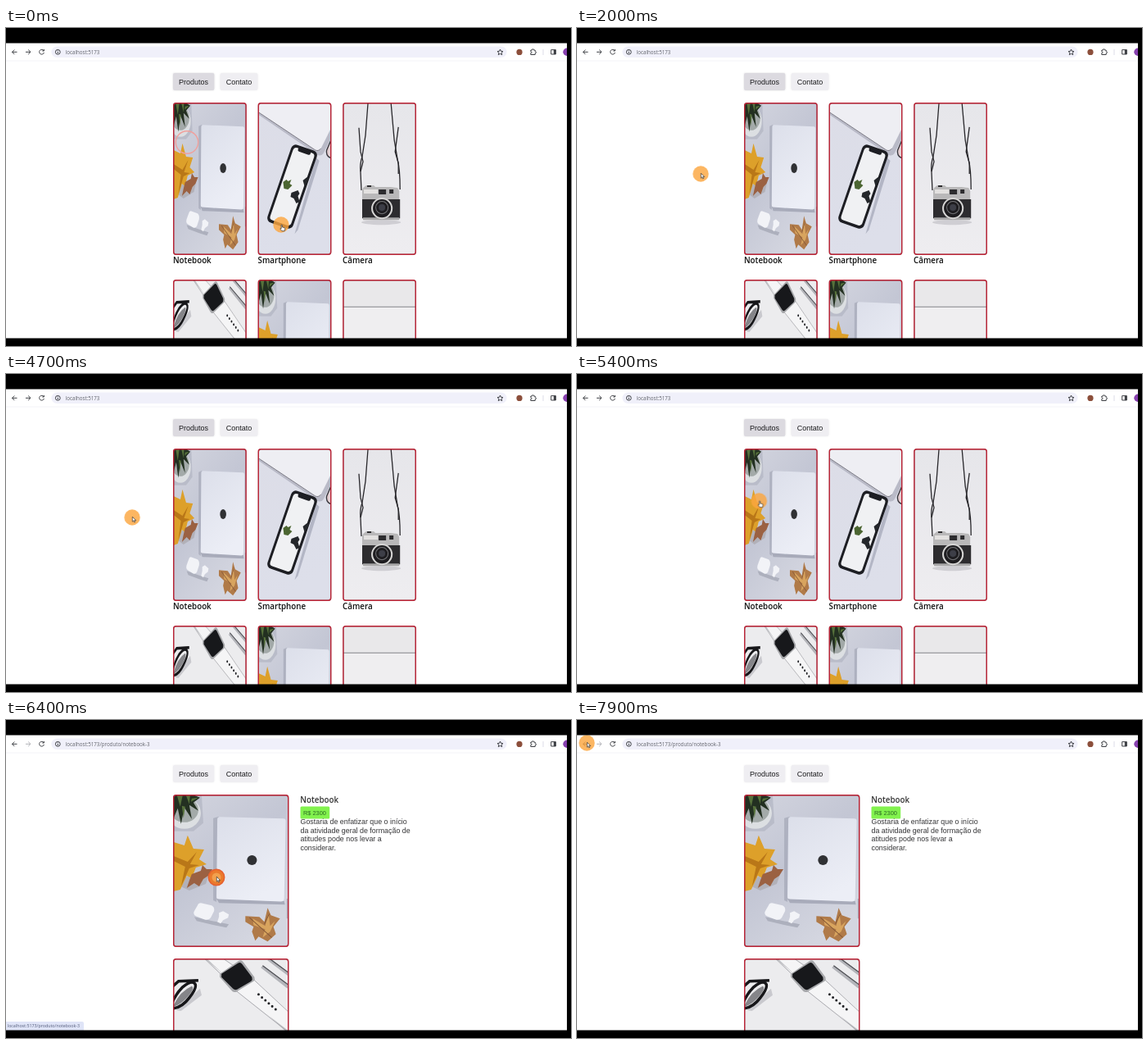
An HTML page that plays this animation: 690 by 388 pixels, repeating every 8 s.

```html
<!DOCTYPE html>
<html lang="pt-BR">
<head>
<meta charset="utf-8">
<title>Produtos</title>
<style>
html, body { margin: 0; width: 100%; height: 100%; overflow: hidden; background: #000; }
#stage { display: block; width: 690px; height: 388px; }
text { font-family: "Liberation Sans", Arial, sans-serif; font-size: 9px; fill: #1d1d1f; white-space: pre; }
.name { font: 600 9.8px "Open Sans", "Noto Sans", sans-serif; fill: #111; }
.url { font: 6.2px "Open Sans", "Noto Sans", sans-serif; fill: #62646c; }
.status { font: 5.3px "Open Sans", "Noto Sans", sans-serif; fill: #555d7c; }
.body { font-size: 8.9px; fill: #343436; }
.price { font-size: 7.4px; fill: #2c6b24; }
.btn { fill: #efeef2; filter: drop-shadow(0 .5px .8px #0001); }
.btn.on { fill: #dcdae0; }
.card { fill: none; stroke: #bd2437; stroke-width: 1.4; filter: drop-shadow(.8px .8px .7px #0005); }
.icon { fill: none; stroke: #3f4146; stroke-width: 1; stroke-linejoin: round; }
.strap { fill: none; stroke: #28272b; stroke-width: 1.3; }
.spot { fill: #fba63f; opacity: .82; }

.list, .detail, .hover, .old, .hand, .arrow, .press { animation: 8s step-end infinite; }
.list { animation-name: list; }
.detail { animation-name: detail; }
.hover { animation-name: hover; }
.old { animation-name: old; }
.hand { animation-name: hand; }
.arrow { animation-name: arrow; }
.press { animation-name: press; }
.ripple { animation: ripple 8s linear infinite; }
#cursor { animation: travel 8s linear infinite; }

@keyframes list { 0% { visibility: visible } 80%, 100% { visibility: hidden } }
@keyframes detail { 0% { visibility: hidden } 80%, 100% { visibility: visible } }
@keyframes hover { 0% { visibility: hidden } 75% { visibility: visible } 87.5%, 100% { visibility: hidden } }
@keyframes old { 0% { visibility: visible } 1.25%, 100% { visibility: hidden } }
@keyframes hand {
  0% { visibility: visible } 19.5% { visibility: hidden } 34.5% { visibility: visible }
  38.5% { visibility: hidden } 64% { visibility: visible } 80%, 100% { visibility: hidden }
}
@keyframes arrow {
  0% { visibility: hidden } 19.5% { visibility: visible } 34.5% { visibility: hidden }
  38.5% { visibility: visible } 64% { visibility: hidden } 80%, 100% { visibility: visible }
}
@keyframes press { 0% { visibility: hidden } 80% { visibility: visible } 83.75%, 100% { visibility: hidden } }
@keyframes ripple {
  0%, 79.9% { opacity: 0; transform: scale(1) }
  80%, 82.5% { opacity: 1; transform: scale(1) }
  85% { opacity: .5; transform: scale(1.4) }
  86%, 100% { opacity: 0; transform: scale(1.4) }
}
@keyframes travel {
  0% { transform: translate(336px, 240px) }
  3.75% { transform: translate(333px, 239.5px) }
  11.25% { transform: translate(284px, 225px) }
  15% { transform: translate(262px, 217.5px) }
  22.5% { transform: translate(162px, 182px) }
  25% { transform: translate(151px, 178px) }
  33.75% { transform: translate(200px, 160px) }
  37.5% { transform: translate(210px, 156px) }
  42.5%, 58.75% { transform: translate(154px, 175px) }
  68.75% { transform: translate(232px, 152px) }
  72.5%, 85% { transform: translate(257px, 192px); animation-timing-function: ease-in-out }
  93.75%, 100% { transform: translate(12px, 28px) }
}
</style>
</head>
<body>
<svg id="stage" viewBox="0 0 690 388" xmlns="http://www.w3.org/2000/svg">
<defs>
  <linearGradient id="desk" x2=".6" y2="1">
    <stop stop-color="#d3d5df"/><stop offset=".5" stop-color="#c3c6d4"/><stop offset="1" stop-color="#d4d6e0"/>
  </linearGradient>
  <linearGradient id="lid" x2=".5" y2="1">
    <stop stop-color="#dcdfea"/><stop offset="1" stop-color="#eceef6"/>
  </linearGradient>
  <linearGradient id="table" x2=".4" y2="1">
    <stop stop-color="#dcdde7"/><stop offset="1" stop-color="#dddfea"/>
  </linearGradient>
  <linearGradient id="paper" x2="0" y2="1">
    <stop stop-color="#e6e6ea"/><stop offset="1" stop-color="#eeedf0"/>
  </linearGradient>

  <symbol id="notebook" viewBox="0 0 139 184" preserveAspectRatio="none">
    <path fill="url(#desk)" d="M0 0h139v184H0z"/>
    <path fill="#aeb1bf" d="M0 0h34l2 34-12 10H0z" opacity=".6"/>
    <ellipse cx="13" cy="22" rx="20" ry="19" fill="#dcdfe2"/>
    <ellipse cx="13" cy="18" rx="17" ry="15" fill="#a3aaa9"/>
    <path fill="#233021" d="M0 0h25l7 3-8 6 6 10-11-7 3 17-9-14-4 20-4-19-5 12z"/>
    <path fill="#56713b" d="M4 0l4 14 3-14zM15 0l4 11 1-11zM10 13l2 15 2-14zM22 4l8-1-9 5z"/>
    <path fill="#8f8785" d="M2 108l18-11 25-7-6 18-20 8z" opacity=".35"/>
    <path fill="#dda02a" d="M0 57l13 4 4-12 7 16 13 1-6 12 9 6-13 4-5 13-6-3-8 17-8 2z"/>
    <path fill="#b97718" d="M0 74l17 7 11-12-8 15 11 1-12 4-10 22 5-24-14-7z"/>
    <path fill="#9b6142" d="M22 96l11-4 2-7 5 5 7 0-5 8-6 4-5 9-6-4-9 6 3-9z"/>
    <path fill="#9a9dad" d="M48 28l7-2-3 104-4-2z" opacity=".55"/>
    <path fill="#a8abba" d="M52 126l82 3 1 4-80-2z"/>
    <path fill="url(#lid)" d="M56 26.500l77 2q3 0 3 3l-2 94q0 4-4 4l-75-3q-3 0-3-3l1-94q0-3 3-3z"/>
    <path fill="#aeb0bd" d="M137 126h2v24h-2z"/>
    <circle cx="95" cy="79" r="6" fill="#303134"/>
    <path fill="#adb0bd" d="M25 148l22 5 20 4-3 4-15-3-21-5z"/>
    <path fill="#f2f3f7" d="M33 131l13 3q4 2 3 7l-4 8q-3 4-8 2l-10-4q-4-2-2-6l4-7q1-3 4-3zM55 143l5-2 7 4-1 4-6 3-3 4-4-2 2-6z"/>
    <path fill="#b07a48" d="M87 147l17 1 6 6 4-17 4 9 11 4-8 10 3 9-10 9-11-6-4 5-4-11 2-6-10-6z"/>
    <path fill="#d8a45e" d="M96 150l15 9 4-15 2 15 6-6-6 13-9 7 3-10-14-5z"/>
    <path fill="none" stroke="#875a37" d="M92 149l27 24m-9-16 6-13"/>
  </symbol>

  <symbol id="phone" viewBox="0 0 88 184" preserveAspectRatio="none">
    <path fill="url(#table)" d="M0 0h88v184H0z"/>
    <path fill="#b9bac7" d="M0 14l72 49q4 2 7-2L88 43V0H0z"/>
    <path fill="#eeeef3" d="M0 0h88v31L76 55q-3 4-7 2L0 11z"/>
    <path fill="none" stroke="#76757f" stroke-width=".9" d="M0 11l69 46q4 2 7-2"/>
    <path fill="#e4cfd2" stroke="#38373d" stroke-width="1.400" d="M89 43l-6 14q-1 5 2 8l5 3"/>
    <path fill="#b3b6c5" d="M70 66l4 4-26 84-4 5z"/>
    <g transform="translate(41 101.500) rotate(19)">
      <rect x="-16.500" y="-50" width="33" height="100" rx="6" fill="#1d1e23"/>
      <rect x="-13.500" y="-46.500" width="27" height="93" rx="4" fill="#f0f1f3"/>
      <rect x="-8" y="-48" width="16" height="5" rx="2" fill="#1d1e23"/>
    </g>
    <path fill="#4c6632" d="M30 96l4-3 2 2 4-2-2 5 3 2-5 5-5-1z"/>
    <path fill="#24272b" d="M40 109l8-3 2 4-2 3 2 7-4 2-3-6-4-2zM54 94l5-4 2 3-5 8z"/>
  </symbol>

  <symbol id="camera" viewBox="0 0 88 184" preserveAspectRatio="none">
    <path fill="url(#paper)" d="M0 0h88v184H0z"/>
    <path class="strap" d="M30 0l-3 39-4 26q-3 8-2 19l1 22M58 0l4 45 4 24q3 11 3 36"/>
    <path class="strap" d="M19 30l2 29 3 12-3 12M67 29l-4 30 4 14v13"/>
    <ellipse cx="46" cy="145" rx="24" ry="3" fill="#cfced3"/>
    <path fill="#b9b8b9" d="M24 103l4-3h9l2 2h18l9 1 2 4v11H23v-12z"/>
    <path fill="#e3e1e0" d="M25 105h17v5H25z"/>
    <path fill="#2d2c2f" d="M43 105h9v6h-9zm13 0h5v5h-5zM29 100h5v2h-5zM23 117h46v23H23z"/>
    <path fill="#a9a8a9" d="M24 139h44v3H24z"/>
    <circle cx="47" cy="128" r="13" fill="#d8d7d6"/>
    <circle cx="47" cy="128" r="11" fill="#1e1d20"/>
    <circle cx="47" cy="127" r="7.500" fill="none" stroke="#77777a" stroke-width="1"/>
    <circle cx="47" cy="127" r="4" fill="#3d3e47"/>
  </symbol>

  <symbol id="watch" viewBox="0 0 139 184" preserveAspectRatio="none">
    <path fill="#ececee" d="M0 0h139v184H0z"/>
    <path fill="#bfc0c4" d="M38 0h19l10 8-8 9zM82 37l12-7 45 47v14z"/>
    <path fill="#f5f5f6" d="M41 0h20l13 9-13 10zM75 38l20-15 44 40v24z"/>
    <path fill="none" stroke="#a5a5aa" stroke-width=".9" d="M38 0l21 20M61 0l13 9M75 38l64 51M95 23l44 41"/>
    <path fill="#a6a7aa" d="M56 18l23-16q3-1 5 1l14 19q1 3-1 5L76 40q-4 1-6-2L56 22z"/>
    <path fill="#17181b" d="M58 18l20-13q3-2 5 1l12 16q1 3-1 5L77 37q-3 1-5-1L58 22z"/>
    <path fill="none" stroke="#202125" stroke-width="3" stroke-linecap="round" stroke-dasharray="0 5.500" d="M103 43l24 21"/>
    <path fill="none" stroke="#b4b5ba" stroke-width="4" d="M107 9l32 25M115 0l25 19"/>
    <path fill="none" stroke="#4d4e53" stroke-width="1.200" d="M108 8l32 24M117 0l23 17"/>
    <path fill="#c9c9ce" d="M3 62l29-26 2 8-25 19z"/>
    <path fill="none" stroke="#17171a" stroke-width="3.500" d="M-2 34l8-7 24-1M0 60q11-2 19-13 11-14 6-18-4-3-14 5Q2 43-3 56"/>
    <path fill="#323238" d="M0 56q8-17 22-23 4 2-4 12Q10 55 0 58z" opacity=".55"/>
  </symbol>

  <symbol id="wall" viewBox="0 0 88 184" preserveAspectRatio="none">
    <path fill="#e9e8ea" d="M0 0h88v184H0z"/>
    <path fill="#efeef0" d="M0 33h88v151H0z"/>
    <path stroke="#85858a" stroke-width="1" d="M0 32.500h88"/>
  </symbol>
</defs>

<path fill="#fff" d="M0 18h685v361H0z"/>
<path fill="#f4f4f8" d="M0 39.500h685v1H0z"/>
<rect x="55.500" y="22.500" width="556" height="13.500" rx="6.700" fill="#f0f0fa"/>

<g class="icon">
  <path d="M13.500 29.300H7.500m2.800-2.800-2.800 2.800 2.800 2.800"/>
  <path class="list" d="M24 29.300h6m-2.800-2.800 2.800 2.800-2.800 2.800"/>
  <path class="detail" stroke="#b3b4b9" d="M24 29.300h6m-2.800-2.800 2.800 2.800-2.800 2.800"/>
  <path d="M46 27.600a2.900 2.900 0 1 0 .4 2.300M46.400 26v2h-2"/>
  <circle cx="63.300" cy="29.300" r="2.900"/>
  <path d="M63.300 28.800v2.200m0-3.600v.7M603.500 26l1 2.300 2.500.2-1.900 1.700.6 2.500-2.200-1.300-2.200 1.300.6-2.500-1.900-1.700 2.500-.2z"/>
  <path d="M640.800 27h1.700q0-1.400 1-1.400t1 1.400h1.700v1.700q1.300 0 1.300 1t-1.300 1v1.800h-5.400v-1.900q1.200 0 1.200-.9t-1.200-1z"/>
  <path d="M665.700 26.600h5.600v5.400h-5.600z"/>
</g>
<path fill="#3f4146" d="M668.800 26.600h2.700v5.400h-2.700z"/>
<path stroke="#dcdde8" d="M656 26v7"/>
<circle cx="627" cy="29.400" r="3.600" fill="#8c4f3b"/>
<circle cx="685" cy="29.300" r="4.700" fill="#8740ae"/>

<rect class="btn" x="204" y="55" width="50.300" height="21" rx="2"/>
<rect class="btn on list" x="204" y="55" width="50.300" height="21" rx="2"/>
<rect class="btn" x="261.500" y="55" width="46" height="21" rx="2"/>
<text x="211" y="68.700">Produtos</text>
<text x="268.700" y="68.700">Contato</text>

<g class="list">
  <text class="url" x="72.700" y="31.600">localhost:5173</text>
  <g id="grid"></g>
</g>

<g class="detail">
  <text class="url" x="72.700" y="31.600">localhost:5173/produto/notebook-3</text>
  <g id="gallery"></g>
  <text class="name" x="359.300" y="101.300" style="fill:#333">Notebook</text>
  <rect x="359.500" y="105.500" width="35.700" height="15" rx="1.500" fill="#82f24e"/>
  <text class="price" x="363" y="115.700">R$ 2300</text>
  <text class="body" y="127">
    <tspan x="359.500">Gostaria de enfatizar que o início</tspan><tspan x="359.500" dy="10.600">da atividade geral de formação de</tspan><tspan x="359.500" dy="10.600">atitudes pode nos levar a</tspan><tspan x="359.500" dy="10.600">considerar.</tspan>
  </text>
</g>

<g class="hover">
  <path fill="#dfe4f7" d="M0 368h93q2 0 2 2v9H0z"/>
  <text class="status" x="1.800" y="374.900">localhost:5173/produto/notebook-3</text>
</g>

<circle class="old" cx="221" cy="139.500" r="13.700" fill="none" stroke="#f0a09c" stroke-width="1.400"/>

<g id="cursor">
  <circle class="spot" r="9.700"/>
  <circle class="press" r="9.500" fill="#ea7a2c"/>
  <circle class="press" r="5.500" fill="#f2a04d"/>
  <circle class="ripple" r="9.700" fill="none" stroke="#e6602f" stroke-width="1.500"/>
  <path class="hand" fill="#fff" stroke="#33302e" stroke-width=".7" d="M.2.200q.8-.6 1.200.3V3l2.600.6q.9.300.8 1.300L4.300 7.700H.9L-1.200 5q0-1 1.400-.3z"/>
  <path class="arrow" fill="#fff" stroke="#33302e" stroke-width=".7" d="M.3-.8v6l1.400-1.300L2.600 6l1-.5-.9-2h1.900z"/>
</g>

<path fill="#000" d="M0 0h690v388H0zM0 18.400v360h685v-360z" fill-rule="evenodd"/>
</svg>
<script>
const cardTop = 91.7, cardHeight = 184.6;
const colX = i => 204.7 + 103.6 * i;
const card = (photo, x, y, width) => `
  <g transform="translate(${x} ${y})">
    <use href="#${photo}" width="${width}" height="${cardHeight}"/>
    <rect class="card" width="${width}" height="${cardHeight}" rx="3"/>
  </g>`;
const label = (text, x) => `<text class="name" x="${x - .8}" y="286.6">${text}</text>`;
const fill = (id, parts) => { document.getElementById(id).innerHTML = parts.join(""); };

const photoRows = [["notebook", "phone", "camera"], ["watch", "notebook", "wall"]];
const labels = ["Notebook", "Smartphone", "Câmera"];

fill("grid", [
  ...photoRows.flatMap((row, r) => row.map((photo, i) => card(photo, colX(i), cardTop + 216 * r, 88.4))),
  ...labels.map((text, i) => label(text, colX(i)))
]);
fill("gallery", ["notebook", "watch"].map((photo, i) => card(photo, colX(0), cardTop + 200 * i, 140)));
</script>
</body>
</html>
```
